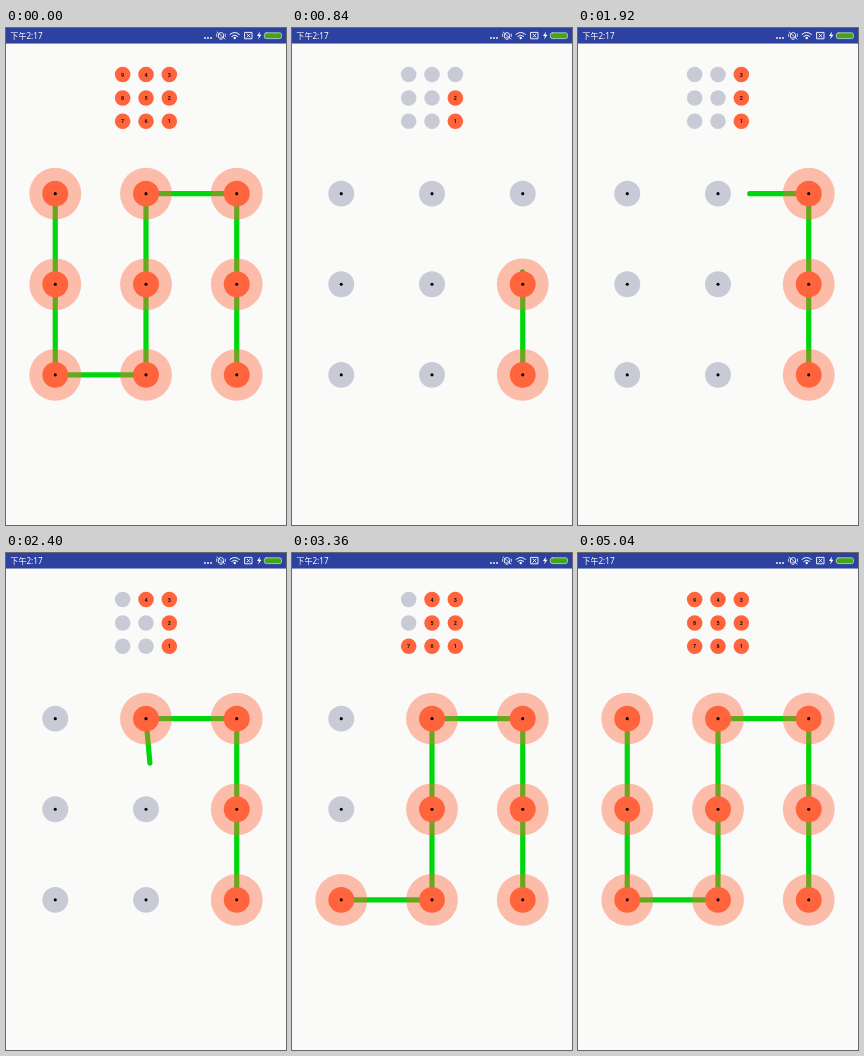
These frames come from a looping animation (280x497 px, 6.12 s). An HTML page with a canvas:

```html
<!DOCTYPE html>
<html lang="zh">
<head>
<meta charset="utf-8">
<style>
html, body { margin: 0; width: 100%; height: 100%; overflow: hidden; background: #fafaf8; }
canvas { display: block; }
</style>
</head>
<body>
<canvas id="stage" width="280" height="497"></canvas>
<script>
const g = document.getElementById('stage').getContext('2d');
const LOOP = 6120, TICK = 120, START = 240, RELEASE = 4560;
const ORANGE = '#ff643c', GREY = '#c8cbd5', GREEN = '#00d60c';

// The route snakes up and down through the columns, from right to left.
// Pattern coordinates are those of a 1080 x 1920 phone screen.
const nodes = Array.from({ length: 9 }, (_, i) => {
  const col = 2 - Math.floor(i / 3);
  const row = col === 1 ? i % 3 : 2 - i % 3;
  return {
    x: 190 + col * 350, y: 640 + row * 350,
    miniX: 450 + col * 90, miniY: 180 + row * 90
  };
});

// Drags along the route, measured in nodes; the finger rests between them.
const drags = [
  { start: 240, end: 1560, from: 0.42, to: 2, sway: -6.5 },
  { start: 1800, end: 2040, from: 2.3, to: 3, sway: 0 },
  { start: 2400, end: 3360, from: 3.49, to: 5.95, sway: 15 },
  { start: 3600, end: 4200, from: 6.3, to: 8, sway: 39 }
];

const mix = (a, b, p) => a + (b - a) * p;

function fingerAt(t) {
  const drag = drags.filter(d => d.start <= t).pop();
  const p = Math.min(1, (t - drag.start) / (drag.end - drag.start));
  const along = mix(drag.from, drag.to, p);
  const i = Math.min(7, Math.floor(along));
  const a = nodes[i], b = nodes[i + 1];
  return {
    along,
    x: mix(a.x, b.x, along - i) + drag.sway * Math.cos(Math.PI * p),
    y: mix(a.y, b.y, along - i)
  };
}

function disc(x, y, r, color) {
  g.fillStyle = color;
  g.beginPath();
  g.arc(x, y, r, 0, Math.PI * 2);
  g.fill();
}

function stroke(path, width, color) {
  g.lineWidth = width;
  g.strokeStyle = color;
  g.stroke(new Path2D(path));
}

function statusBar() {
  g.fillStyle = '#2d41a0';
  g.fillRect(0, 0, 280, 15.53);
  g.fillStyle = '#fff';
  g.font = '8.1px "Noto Sans", "Noto Sans CJK SC", "Noto Sans CJK", sans-serif';
  g.textAlign = 'left';
  g.fillText('下午2:17', 4.3, 11);
  for (const x of [199, 202, 205]) disc(x, 10, 0.9, '#fff');
  // Muted bell
  stroke('M212.5 9.5V7Q212.5 4.5 215 4.5Q217.5 4.5 217.5 7V9.5ZM214 11.2H216M211 4L219 11M210.7 6V8.5M219.3 6V8.5', 0.8, '#fff');
  // Wi-Fi
  stroke('M224 6.4Q228.7 2.4 233.4 6.4M225.8 8.3Q228.7 5.8 231.6 8.3', 1, '#fff');
  disc(228.7, 10, 1.2, '#fff');
  // Missing SIM
  stroke('M239 4.4H246V10.8H239ZM241 6.1L244 9.1M244 6.1L241 9.1', 0.9, '#fff');
  // Charging battery
  g.fill(new Path2D('M254 3.5L251 8H253L252 11.5L255.5 6.8H253.4Z'));
  g.beginPath();
  g.roundRect(258.3, 4.8, 17.2, 5.8, 2);
  g.fillStyle = '#43a614';
  g.fill();
  g.lineWidth = 0.8;
  g.strokeStyle = '#c5d5d8';
  g.stroke();
}

function pattern(t) {
  const finger = t < RELEASE ? fingerAt(t) : null;
  const count = finger ? Math.floor(finger.along + 0.28) + 1 : nodes.length;
  const points = nodes.slice(0, count);
  if (finger) points.push(finger);
  stroke('M' + points.map(p => p.x + ' ' + p.y).join('L'), 20, GREEN);

  g.font = 'bold 21px Roboto, sans-serif';
  g.textAlign = 'center';
  nodes.forEach((n, i) => {
    const on = i < count, color = on ? ORANGE : GREY;
    if (on) disc(n.x, n.y, 100, 'rgba(255, 100, 60, 0.41)');
    disc(n.x, n.y, 50, color);
    disc(n.x, n.y, 6, '#000');
    disc(n.miniX, n.miniY, 30, color);
    if (on) {
      g.fillStyle = '#201008';
      g.fillText(i + 1, n.miniX, n.miniY + 8);
    }
  });
}

function draw(time) {
  let t = Math.floor(time % LOOP / TICK) * TICK;
  if (t < START) t += LOOP;
  g.fillStyle = '#fafaf8';
  g.fillRect(0, 0, 280, 497);
  g.lineCap = g.lineJoin = 'round';
  statusBar();
  g.save();
  g.scale(280 / 1080, 497 / 1920);
  pattern(t);
  g.restore();
}

function loop() {
  draw(performance.now());
  requestAnimationFrame(loop);
}
loop();
</script>
</body>
</html>
```
